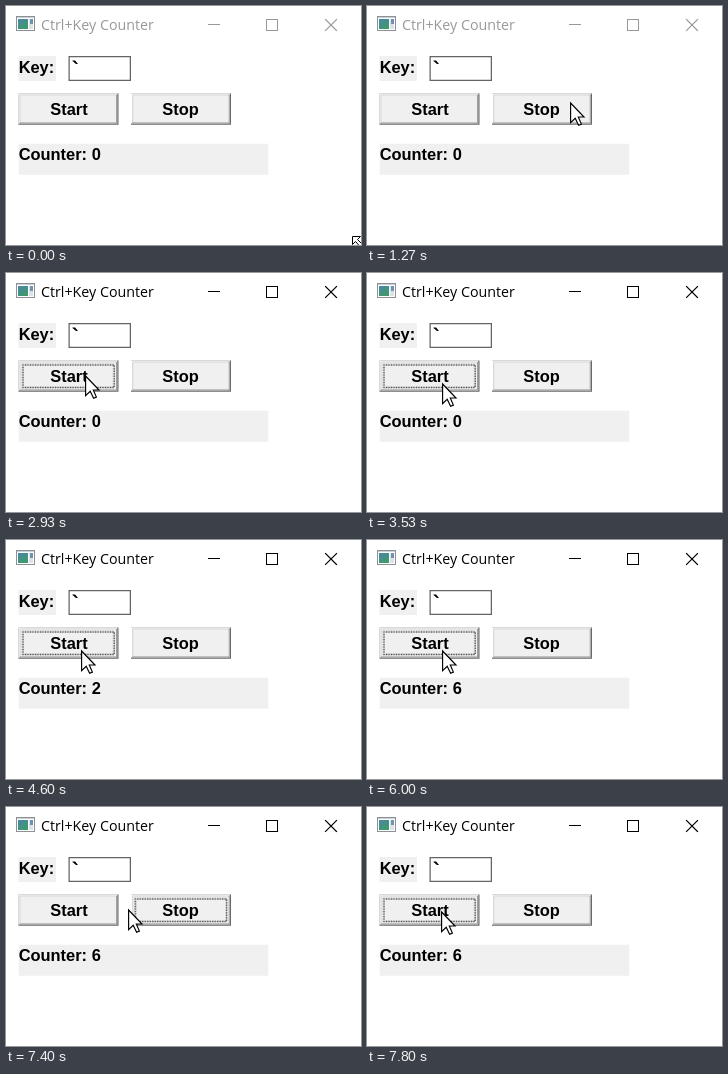
An HTML page that plays this animation: 355x239 px, repeating every 8000 ms.

```html
<!DOCTYPE html>
<html lang="en">
<head>
<meta charset="utf-8">
<title>Ctrl+Key Counter</title>
<style>
html, body { margin: 0; width: 100%; height: 100%; overflow: hidden; background: #fff; }
svg { display: block; }
.stage { width: 355px; height: 239px; }
.client { font: bold 13.15px "Liberation Sans", Arial, sans-serif; }
.client .key { font-size: 17px; }
.mid { text-anchor: middle; }
.panel { fill: #f0f0f0; }
.crisp { shape-rendering: crispEdges; }

.bar, .pointer, .resize, .focus, .digits { animation: 8s step-end infinite; }

.bar { color: #999; animation-name: activate; }
.bar text { font: 14.25px "Open Sans", "Noto Sans", sans-serif; fill: currentColor; }
.bar .controls { fill: none; stroke: currentColor; }
@keyframes activate {
  0% { color: #999; }
  22.5% { color: #000; }
}

.resize { animation-name: leave; }
@keyframes leave {
  0% { visibility: visible; }
  12.5% { visibility: hidden; }
}

.focus { animation-name: focus; }
@keyframes focus {
  0% { transform: translate(0, 300px); }
  36.625% { transform: translate(0, 0); }
  88.375% { transform: translate(90px, 0); }
  97.5% { transform: translate(0, 0); }
}

.digits { animation-name: count; }
@keyframes count {
  0% { transform: translateY(0); }
  52.5% { transform: translateY(-16px); }
  57.5% { transform: translateY(-32px); }
  61.625% { transform: translateY(-48px); }
  65.875% { transform: translateY(-64px); }
  70% { transform: translateY(-80px); }
  75% { transform: translateY(-96px); }
}

.pointer { animation-name: travel; }
@keyframes travel {
  0% { transform: translate(400px, 300px); }
  /* into the window */
  12.5% { transform: translate(336px, 216px); }
  13.375% { transform: translate(295px, 180px); }
  14.125% { transform: translate(256px, 143px); }
  15% { transform: translate(226px, 116px); }
  15.875% { transform: translate(203px, 96px); }
  16.625% { transform: translate(186px, 78px); }
  17.5% { transform: translate(174px, 65px); }
  18.375% { transform: translate(168px, 59px); }
  /* to Start */
  23.375% { transform: translate(155px, 65px); }
  24.125% { transform: translate(135px, 74px); }
  25% { transform: translate(113px, 84px); }
  25.875% { transform: translate(95px, 91px); }
  26.625% { transform: translate(84px, 98px); }
  28.375% { transform: translate(79px, 102px); }
  41.625% { transform: translate(78px, 104px); }
  42.5% { transform: translate(77px, 106px); }
  43.375% { transform: translate(76px, 109px); }
  44.125% { transform: translate(75px, 110px); }
  /* to Stop and back */
  82.5% { transform: translate(88px, 107px); }
  83.375% { transform: translate(117px, 103px); }
  84.125% { transform: translate(131px, 101px); }
  92.5% { transform: translate(122px, 102px); }
  93.375% { transform: translate(98px, 103px); }
  94.125% { transform: translate(80px, 104px); }
  95% { transform: translate(74px, 104px); }
}
</style>
</head>
<body>
<svg class="stage" viewBox="0 0 355 239">
  <defs>
    <linearGradient id="teal" x2=".6" y2="1">
      <stop stop-color="#4a86a8"/>
      <stop offset="1" stop-color="#3f9a6b"/>
    </linearGradient>
    <g id="button">
      <path fill="#696969" d="M0 0H80V25H0z"/>
      <path fill="#fff" d="M0 0H79V24H0z"/>
      <path fill="#a0a0a0" d="M1 1H79V24H1z"/>
      <path fill="#e3e3e3" d="M1 1H78V23H1z"/>
      <path fill="#f0f0f0" d="M2 2H78V23H2z"/>
    </g>
  </defs>

  <g class="crisp">
    <path fill="#fff" stroke="#8b9196" d="M10.5 10.5H28.5V24.5H10.5z"/>
    <path fill="#c9d0d4" d="M11 11H28V12H11z"/>
    <path fill="url(#teal)" d="M12 13H22V23H12z"/>
    <path fill="#dde2e6" d="M23 13H27V23H23z"/>
    <path fill="#6f93b5" d="M24 13H27V18H24z"/>
  </g>

  <g class="bar">
    <text x="35" y="24">Ctrl+Key Counter</text>
    <g class="controls">
      <path class="crisp" d="M202 18.5H214M260.5 13.5H271.5V24.5H260.5z"/>
      <path stroke-width="1.15" stroke-linecap="square" d="M319.5 13.5L330.5 24.5M330.5 13.5L319.5 24.5"/>
    </g>
  </g>

  <!-- the client area is drawn at 96 dpi and enlarged to 120 dpi -->
  <g class="client" transform="scale(1.25)">
    <path class="panel" d="M10 40H40V60H10z"/>
    <text x="10.1" y="53.6">Key:</text>
    <path fill="#fff" stroke="#646464" d="M50.5 40.5H99.5V59.5H50.5z"/>
    <text class="key" x="52.6" y="56.6">`</text>

    <use href="#button" x="10" y="70"/>
    <text class="mid" x="50.4" y="87.2">Start</text>
    <use href="#button" x="100" y="70"/>
    <text class="mid" x="139.6" y="87.2">Stop</text>
    <path class="focus" fill="none" stroke="#000" stroke-dasharray="1" d="M13 73.5H87M86.5 74V92M13 91.5H87M13.5 73V92"/>

    <path class="panel" d="M10 110H210V135H10z"/>
    <text x="10.1" y="123.2">Counter:</text>
    <svg x="68" y="111" width="9" height="15">
      <g class="digits">
        <text x=".5" y="12.2">0</text>
        <text x=".5" y="28.2">1</text>
        <text x=".5" y="44.2">2</text>
        <text x=".5" y="60.2">3</text>
        <text x=".5" y="76.2">4</text>
        <text x=".5" y="92.2">5</text>
        <text x=".5" y="108.2">6</text>
      </g>
    </svg>
  </g>

  <path class="resize" fill="#fff" stroke="#000" d="M346.5 230.5H354.5L351.5 233.5L361 243L358 245L349.5 235.5L346.5 238.5z"/>
  <path class="pointer" fill="#fff" stroke="#000" stroke-width="1.15" d="M.6 1V20.6L5.2 16.3L8.6 23.3L11.4 22.1L8.3 15H14z"/>
</svg>
</body>
</html>
```
